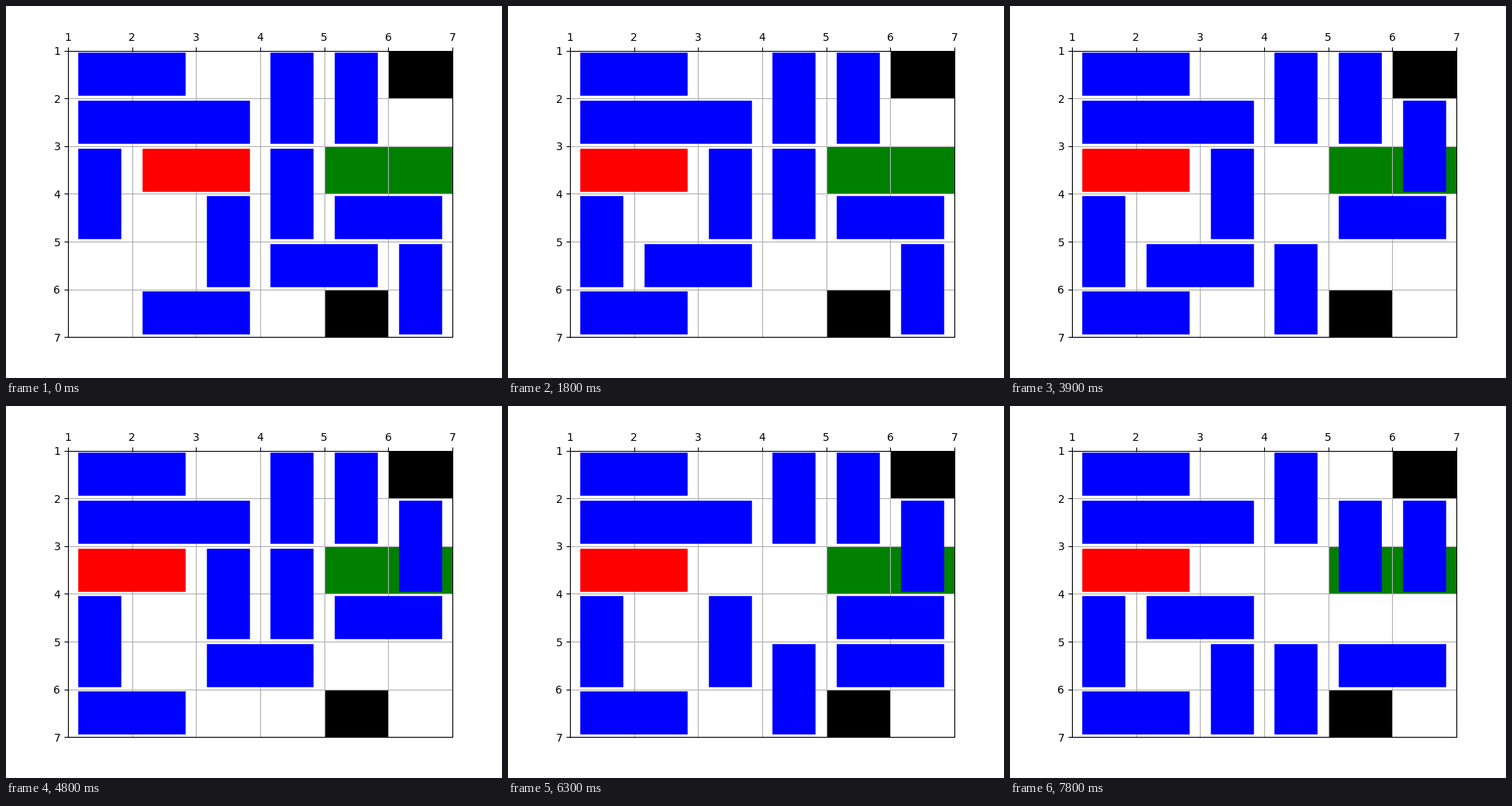
A matplotlib script for the animation above (8 s loop, 640 by 480 pixels).

```python
import matplotlib.pyplot as plt
from matplotlib.animation import FuncAnimation
from matplotlib.patches import Rectangle

SIZE = 6
TICK_MS = 100
TICKS_PER_MOVE = 3
TICKS = 80

# name: (column, row, length, horizontal)
CARS = {
    "A": (1, 1, 2, True),
    "B": (1, 2, 3, True),
    "C": (1, 3, 2, False),
    "D": (4, 1, 2, False),
    "E": (5, 1, 2, False),
    "F": (4, 3, 2, False),
    "G": (5, 4, 2, True),
    "H": (3, 4, 2, False),
    "I": (4, 5, 2, True),
    "J": (6, 5, 2, False),
    "K": (2, 6, 2, True),
    "R": (2, 3, 2, True),
}
# One-cell moves: + is right or down, - is left or up.
MOVES = ("K- C+ R- H- I- I- F+ F+ G- J- J- J- G+ "
         "F- F- I+ I+ H+ I+ F+ F+ G- H+ G- G- E+").split()
WALLS = [(6, 1), (5, 6)]
GOAL = [(5, 3), (6, 3)]

fig, ax = plt.subplots(figsize=(6.4, 4.8), dpi=100)
ax.set_xlim(1, SIZE + 1)
ax.set_ylim(SIZE + 1, 1)
ax.set_xticks(range(1, SIZE + 2))
ax.set_yticks(range(1, SIZE + 2))
ax.xaxis.tick_top()
ax.grid(True)


def fill_cells(cells, color):
    for cell in cells:
        ax.add_patch(Rectangle(cell, 1, 1, facecolor=color, linewidth=0))


fill_cells(WALLS, "black")
fill_cells(GOAL, "green")

lines = {
    name: ax.plot([], [], color="red" if name == "R" else "blue",
                  linewidth=40, solid_capstyle="projecting")[0]
    for name in CARS
}


def place(name, shift):
    col, row, length, horizontal = CARS[name]
    x, y = col + 0.5, row + 0.5
    if horizontal:
        x += shift
        lines[name].set_data([x, x + length - 1], [y, y])
    else:
        y += shift
        lines[name].set_data([x, x], [y, y + length - 1])


def draw(tick):
    shifts = dict.fromkeys(CARS, 0)
    for name, sign in MOVES[:tick // TICKS_PER_MOVE]:
        shifts[name] += 1 if sign == "+" else -1
    for name, shift in shifts.items():
        place(name, shift)
    return list(lines.values())


anim = FuncAnimation(fig, draw, frames=TICKS, interval=TICK_MS,
                     repeat=True, repeat_delay=0)
plt.show()
```
